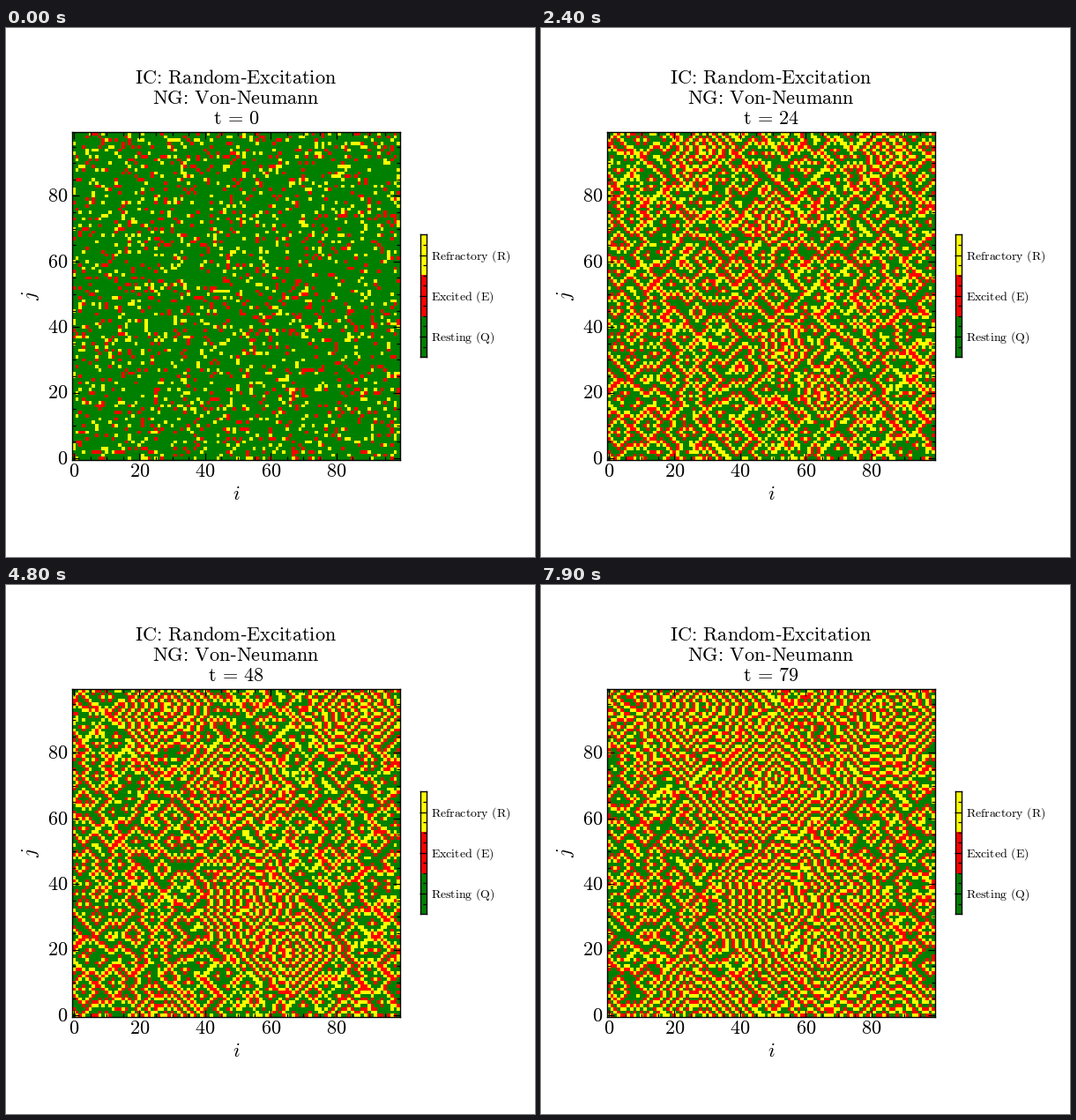
A matplotlib script that plays this animation: 600 px wide and 600 px high, repeating every 8000 ms.

```python
import numpy as np
import matplotlib.pyplot as plt
from matplotlib.animation import FuncAnimation
from matplotlib.colors import ListedColormap

plt.rcParams["mathtext.fontset"] = "cm"

SIZE, N, STEPS = 600, 100, 80
REST, EXCITED, REFRACTORY = range(3)
COLORS = ["#008000", "#ff0000", "#ffff00"]
SOURCES = [(30, 94), (51, 72), (83, 94), (55, 32), (67, 19)]
CORE = np.array([[0, 1, 2], [2, 1, 0]])
DENSITY = 0.1
rng = np.random.default_rng(12)


def random_cells(shape):
    weights = [1 - 2 * DENSITY, DENSITY, DENSITY]
    return rng.choice(3, size=shape, p=weights)


def step(g):
    hot = g == EXCITED
    near = (np.roll(hot, 1, 0) | np.roll(hot, -1, 0)
            | np.roll(hot, 1, 1) | np.roll(hot, -1, 1))
    return np.where(g == REST, near * EXCITED, (g + 1) % 3)


def evolve(g, count):
    run = [g]
    for _ in range(count - 1):
        run.append(step(run[-1]))
    return np.array(run)


def plant(g):
    for i, j in SOURCES:
        g[j:j + 2, i - 1:i + 2] = CORE


def start_grid():
    """Random start whose fast period-3 emitters sit only at SOURCES."""
    g = random_cells((N, N))
    plant(g)
    jj, ii = np.mgrid[:N, :N]
    free = np.ones((N, N), bool)
    for i, j in SOURCES:
        di, dj = abs(ii - i), abs(jj - j)
        free &= np.minimum(di, N - di) + np.minimum(dj, N - dj) > 12
    for _ in range(60):
        run = evolve(g, 24)
        fast = (run[12:21] == run[15:24]).all(0) & run[12:15].any(0) & free
        if not fast.any():
            break
        patch = fast.copy()
        for _ in range(3):
            for axis in (0, 1):
                patch |= np.roll(patch, 1, axis) | np.roll(patch, -1, axis)
        g[patch] = random_cells(patch.sum())
        plant(g)
    return g


states = evolve(start_grid(), STEPS)

fig = plt.figure(figsize=(6, 6), dpi=100, facecolor="white")


def box(x0, y0, x1, y1):
    ax = fig.add_axes([x0 / SIZE, 1 - y1 / SIZE,
                       (x1 - x0) / SIZE, (y1 - y0) / SIZE])
    for spine in ax.spines.values():
        spine.set_linewidth(1)
    ax.tick_params(which="both", direction="in", width=0.9,
                   labelbottom=False, labelleft=False)
    ax.tick_params(which="major", length=6)
    ax.tick_params(which="minor", length=3)
    return ax


def roman(s):
    # U+2010 keeps a short hyphen instead of a minus sign
    return r"$\text{%s}$" % s.replace("-", "\u2010")


def label(x, y, s, size=16, ha="center", va="baseline", **kw):
    return fig.text(x / SIZE, 1 - y / SIZE, s, fontsize=size,
                    ha=ha, va=va, **kw)


LEFT, TOP, SIDE = 75.2, 117.8, 372
BOTTOM = TOP + SIDE

ax = box(LEFT, TOP, LEFT + SIDE, BOTTOM)
cmap = ListedColormap(COLORS)
image = ax.imshow(states[0], cmap=cmap, vmin=0, vmax=2, origin="lower",
                  interpolation="nearest", aspect="auto")
ax.tick_params(which="both", top=True, right=True)
for axis in (ax.xaxis, ax.yaxis):
    axis.set_ticks(range(0, N, 20))
    axis.set_ticks([v for v in range(0, N, 5) if v % 20], minor=True)

for v in range(0, N, 20):
    offset = (v + 0.5) * SIDE / N
    label(LEFT + offset, 509, roman(str(v)))
    label(70, BOTTOM - offset + 6.85, roman(str(v)), ha="right")

label(261.5, 535, "$i$")
label(27.5, 303.8, "$j$", va="center", rotation=90)
label(261, 63, roman("IC: Random-Excitation"))
label(261, 86, roman("NG: Von-Neumann"))
clock = label(261, 109, roman("t = 0"))

bar = box(470.2, 234.4, 477.1, 373.1)
bar.imshow([[0], [1], [2]], cmap=cmap, vmin=0, vmax=2, origin="lower",
           interpolation="nearest", aspect="auto", extent=(0, 1, 0, 3))
bar.set_xticks([])
bar.yaxis.tick_right()
bar.tick_params(which="both", labelright=False)
bar.set_yticks([0.5, 1.5, 2.49])
bar.set_yticks([k / 4 for k in range(1, 12) if k % 4 != 2], minor=True)
for k, name in enumerate(["Resting (Q)", "Excited (E)", "Refractory (R)"]):
    label(482, 354.2 - 45.6 * k, roman(name), size=10, ha="left")


def draw(t):
    image.set_data(states[t])
    clock.set_text(roman(f"t = {t}"))
    return image, clock


anim = FuncAnimation(fig, draw, frames=STEPS, interval=100,
                     repeat=True, repeat_delay=0)
plt.show()
```
